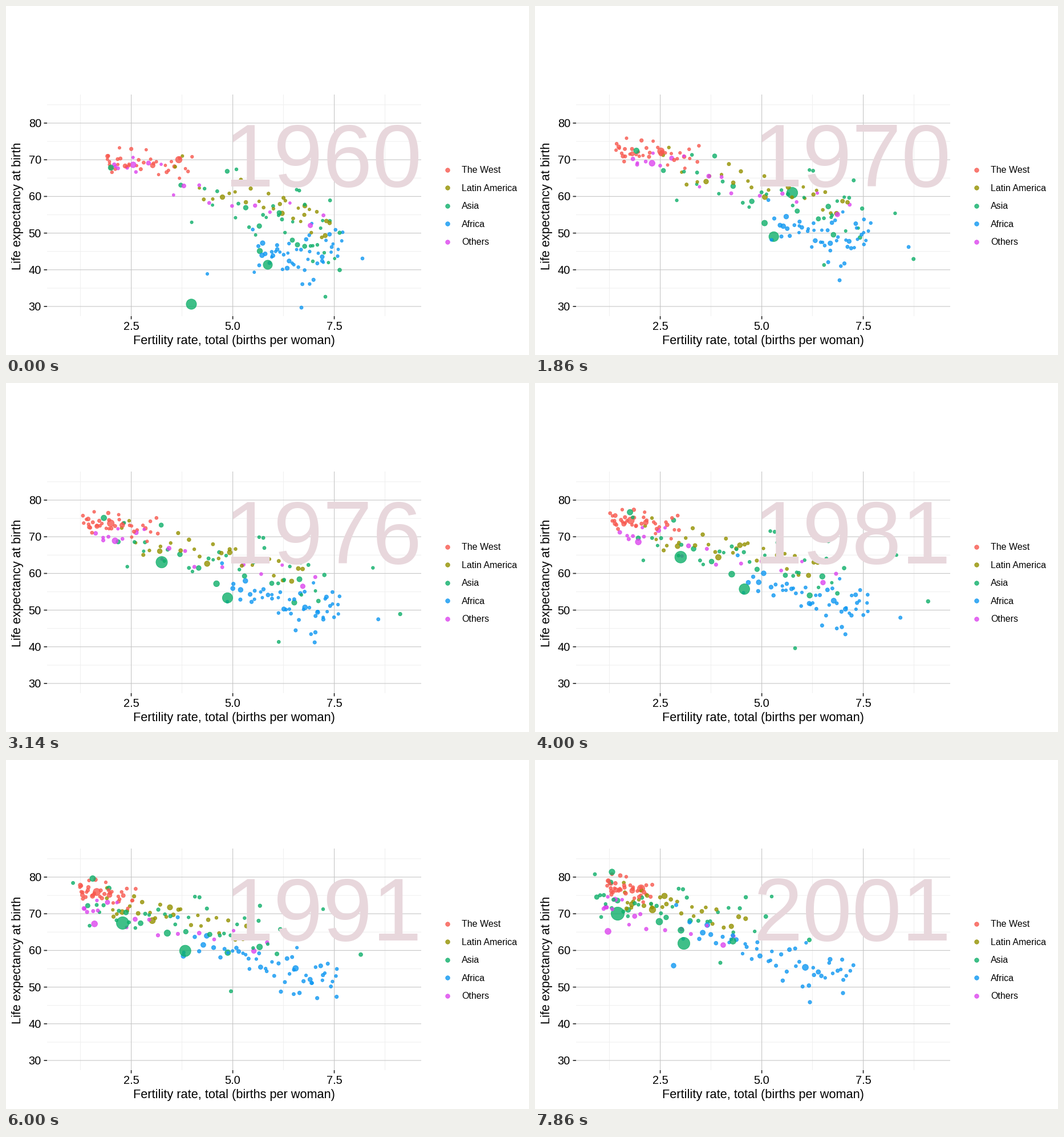
A matplotlib script that plays this animation: 917 px wide and 611 px high, repeating every 8 s.

```python
import numpy as np
import matplotlib.pyplot as plt
from matplotlib.animation import FuncAnimation
from matplotlib.patches import Rectangle

W, H, DPI = 917, 611, 128
PT = 72 / DPI                      # points per pixel
LOOP, TICK, STEPS = 8000, 40, 56   # ms, ms, pictures per loop
YEARS_PER_STEP = 55 / 74

WEST, LATIN, ASIA, AFRICA, OTHERS = (
    "#F8594F", "#949100", "#0FAF6A", "#0F98F2", "#DC45EE")
LEGEND = [("The West", WEST), ("Latin America", LATIN), ("Asia", ASIA),
          ("Africa", AFRICA), ("Others", OTHERS)]
ALPHA, EDGE = 0.8, 0.9
LEFT, RIGHT, TOP, BOTTOM = 72, 728, 155, 543

rng = np.random.default_rng(12)
steps = np.arange(STEPS)
time = steps / (STEPS - 1)
dots = []                          # (colour, x path, y path, radius path)


def add(color, x, y, r0, r1):
    dots.append((color, x, y, r0 + (r1 - r0) * time))


def glide(color, r0, r1, start, mid, end, dip=None):
    """One country on a parabola in time; dip is a brief fall (step, depth)."""
    t = time[:, None]
    path = ((1 - t) * (1 - 2 * t) * np.array(start)
            + 4 * t * (1 - t) * np.array(mid)
            + t * (2 * t - 1) * np.array(end))
    x, y = path.T
    if dip:
        y = y + dip[1] * np.exp(-((steps - dip[0]) / 2) ** 2)
    add(color, x, y, r0, r1)


def band(rank, x0, x1, skew, y0, y1, spread, side):
    """Place at a rank (0 to 1) along a sloping band, off to one side."""
    f = rank ** skew
    return x0 + (x1 - x0) * f, y0 + (y1 - y0) * f + spread * side


def swarm(color, count, pace, start, end):
    """A group drifting from one band to another.

    Countries with small families change early, the others late;
    life expectancy rises quickly at first.
    """
    for rank in (np.arange(count) + rng.uniform(0.1, 0.9, count)) / count:
        side = np.clip(rng.normal(), -1.7, 1.7)
        phase = rng.uniform(0, 2 * np.pi)
        xa, ya = band(rank, *start, side)
        xb, yb = band(rank, *end, side)
        fall = time ** (pace * (0.6 + 1.4 * rank))
        x = xa + (xb - xa) * fall + 3 * np.sin(steps / 7 + phase)
        y = ya + (yb - ya) * time ** 0.7 + 2 * np.cos(steps / 9 + phase)
        r = min(2.8 + rng.exponential(0.5), 4.6)
        add(color, x, y, r, r + 0.3)


# The largest country swings widely in the first ten years
add(ASIA,
    np.interp(steps, [0, 1.4, 4, 13, 22, 36, 55],
              [325, 275, 565, 451, 273, 232, 145]),
    np.interp(steps, [0, 4, 13, 36, 55], [522, 392, 327, 293, 269]), 9.5, 12)

# Other large countries
glide(ASIA, 8.5, 11, (459, 453), (369, 362), (261, 321))
glide(WEST, 6.2, 7, (303, 269), (169, 241), (186, 225))
glide(ASIA, 5.2, 6.3, (445, 429), (347, 336), (218, 283))
glide(LATIN, 4.6, 6.2, (484, 363), (324, 306), (206, 262))
glide(ASIA, 5.2, 5.6, (184, 283), (167, 227), (135, 196))
glide(OTHERS, 5.6, 5.8, (223, 278), (182, 278), (128, 300))
glide(ASIA, 4.4, 5.9, (479, 362), (505, 339), (347, 317))
glide(ASIA, 4.5, 5.8, (511, 418), (484, 373), (256, 298))
glide(AFRICA, 4.2, 5.8, (493, 459), (524, 382), (474, 363))
glide(LATIN, 4.2, 5.4, (524, 350), (362, 285), (227, 238))
glide(AFRICA, 4, 4.7, (468, 437), (376, 350), (243, 360))

# Countries that stray from their group
glide(ASIA, 3.3, 4, (560, 509), (690, 384), (481, 315))
glide(ASIA, 3.1, 3.2, (558, 432), (635, 303), (415, 239))
glide(ASIA, 3.2, 3.4, (404, 286), (174, 236), (105, 200))
glide(AFRICA, 3.4, 3.6, (518, 528), (544, 441), (540, 408))
glide(AFRICA, 3, 3.1, (353, 469), (440, 364), (364, 339))
glide(ASIA, 3.2, 3.5, (538, 447), (458, 440), (325, 355), dip=(25.5, 120))
glide(AFRICA, 3.3, 3.6, (625, 442), (642, 411), (482, 424), dip=(46, 115))

# Everyone else: x from, x to, skew, y from, y to, spread
swarm(WEST, 37, 0.4, (177, 330, 1.5, 268, 285, 13), (127, 206, 1.5, 216, 236, 11))
swarm(LATIN, 29, 0.75, (250, 575, 0.56, 285, 375, 22), (157, 378, 1.7, 242, 275, 15))
swarm(ASIA, 35, 1, (252, 589, 0.5, 295, 405, 35), (110, 415, 1.5, 240, 280, 20))
swarm(AFRICA, 48, 2.2, (430, 590, 0.9, 440, 430, 31), (230, 560, 0.7, 285, 385, 23))
swarm(OTHERS, 18, 1.4, (188, 586, 1.8, 272, 385, 16), (122, 375, 2.5, 252, 325, 14))

dots = [dots[i] for i in rng.permutation(len(dots))]
colors = [d[0] for d in dots]
X, Y, R = (np.array([d[i] for d in dots]) for i in (1, 2, 3))


def area(r):
    return (2 * (r - EDGE / 2) * PT) ** 2


plt.rcParams["font.family"] = ["Liberation Sans", "DejaVu Sans"]
fig = plt.figure(figsize=(W / DPI, H / DPI), dpi=DPI, facecolor="white")
ax = fig.add_axes([0, 0, 1, 1])
ax.set(xlim=(0, W), ylim=(H, 0))
ax.axis("off")


def line(x0, y0, x1, y1, color, width):
    ax.plot([x0, x1], [y0, y1], color=color, lw=width * PT, zorder=1,
            solid_capstyle="butt", snap=False)


def label(x, y, text, size, color="black", **kw):
    return ax.text(x, y, text, fontsize=size * PT, color=color,
                   va="baseline", **kw)


for x in np.arange(130.5, 700, 178):
    line(x, TOP, x, BOTTOM, "#F0F0F0", 1.1)
for y in 172.9 + 64.2 * np.arange(6):
    line(LEFT, y, RIGHT, y, "#F0F0F0", 1.1)
for i, name in enumerate(["2.5", "5.0", "7.5"]):
    x = 219.6 + 178 * i
    line(x, TOP, x, BOTTOM, "#C6C6C6", 1.1)
    line(x, BOTTOM, x, BOTTOM + 5.5, "#333333", 1.8)
    label(x, 567, name, 20, ha="center")
for i in range(6):
    y = 205 + 64.2 * i
    line(LEFT, y, RIGHT, y, "#C6C6C6", 1.1)
    line(LEFT - 5.5, y, LEFT, y, "#333333", 1.8)
    label(62, y + 7, str(80 - 10 * i), 20, ha="right")

label(399.5, 592, "Fertility rate, total (births per woman)", 21.8,
      ha="center")
label(26, 350, "Life expectancy at birth", 21.8, ha="center", rotation=90,
      rotation_mode="anchor")

for i, (name, color) in enumerate(LEGEND):
    y = 286.5 + 31.5 * i
    ax.scatter([773.5], [y], s=area(4.2), c=color, alpha=ALPHA,
               linewidths=EDGE * PT)
    label(799, y + 5.7, name, 16)

cloud = ax.scatter(X[:, 0], Y[:, 0], s=area(R[:, 0]), c=colors, alpha=ALPHA,
                   linewidths=EDGE * PT, zorder=2)
cloud.set_clip_path(Rectangle((LEFT, TOP), RIGHT - LEFT, BOTTOM - TOP,
                              transform=ax.transData))
year = label(382.5, 316.5, "1960", 156, "#E8D7DC", ha="left", zorder=3)


def draw(n):
    i = int((n + 0.6) * TICK * STEPS / LOOP)
    cloud.set_offsets(np.column_stack([X[:, i], Y[:, i]]))
    cloud.set_sizes(area(R[:, i]))
    year.set_text(str(round(1960 + i * YEARS_PER_STEP)))
    return cloud, year


anim = FuncAnimation(fig, draw, frames=LOOP // TICK, interval=TICK,
                     init_func=lambda: draw(0), repeat=True, repeat_delay=0)
plt.show()
```
